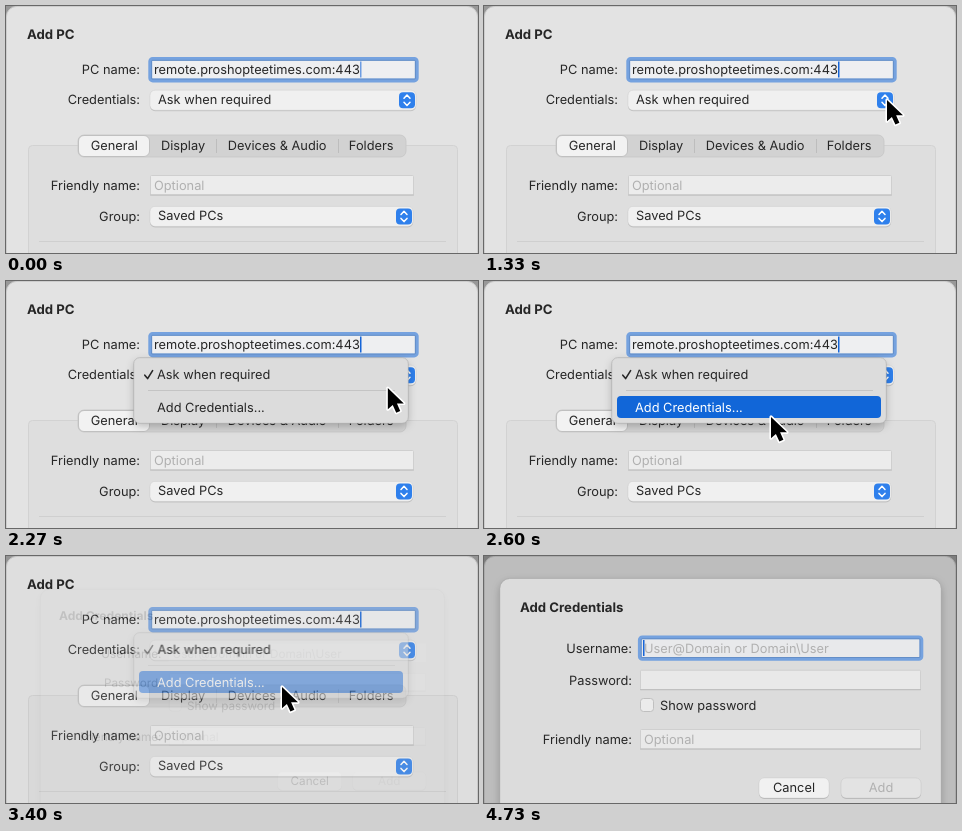
An HTML page for the animation above (5.14 s loop, 472 by 247 pixels).

```html
<!DOCTYPE html>
<html lang="en">
<head>
<meta charset="utf-8">
<title>Add PC</title>
<style>
html, body { margin: 0; width: 100%; height: 100%; overflow: hidden; background: #989898; }
svg { display: block; width: 472px; height: 247px; }
text { font: 12.8px Inter, "Liberation Sans", sans-serif; fill: #262626; white-space: pre; text-rendering: geometricPrecision; }
.bold { font-size: 13.2px; font-weight: 700; }
.end { text-anchor: end; }
.mid { text-anchor: middle; }
.hint { fill: #b0b0b0; }
.lit { fill: #fff; }
.caret { fill: #1565d8; }
.ring { fill: none; stroke: #75a2df; stroke-width: 3.8; }
.rim { fill: none; stroke: #6089c2; stroke-width: .8; }
</style>
</head>
<body>
<svg id="stage" viewBox="0 0 472 247" xmlns="http://www.w3.org/2000/svg"></svg>
<script>
const LOOP = 5140;
const stage = document.getElementById('stage');

const rect = (x, y, w, h, r, fill, more = '') =>
  `<rect x="${x}" y="${y}" width="${w}" height="${h}" rx="${r}" fill="${fill}" ${more}/>`;
const text = (x, y, s, cls = '') => `<text x="${x}" y="${y}" class="${cls}">${s}</text>`;
const line = (x1, x2, y, color) =>
  `<path d="M${x1} ${y}H${x2}" stroke="${color}" fill="none"/>`;

const field = (x, y, w, fill) =>
  rect(x + .5, y + .5, w - 1, 19.5, 1, fill, 'stroke="#cfcfcf"') +
  line(x, x + w, y + 20, '#bcbcbc');

// Focus ring around a field whose inner edge is given
const ring = (id, x, y, w, h) =>
  `<g id="${id}"><rect class="ring" x="${x - 1.4}" y="${y - 1.4}" width="${w + 2.8}" height="${h + 2.8}" rx="2.5"/>` +
  `<rect class="rim" x="${x}" y="${y}" width="${w}" height="${h}" rx="1"/></g>`;

const button = (x, y, w, fill) =>
  rect(x, y + 1, w, 20, 5, '#000', 'opacity=".13"') +
  rect(x, y, w, 20, 5, fill, 'stroke="#000" stroke-opacity=".07" stroke-width=".8"');

function popup(x, y, w, label) {
  const bx = x + w - 17, cx = bx + 8, cy = y + 10;
  return button(x, y, w, '#f0f0f0') + text(152, y + 14, label) +
    rect(bx, y + 2, 16, 16, 4, '#2f80ec') +
    `<path d="M${cx - 3} ${cy - 2}l3-3.2 3 3.2M${cx - 3} ${cy + 2}l3 3.2 3-3.2"
      fill="none" stroke="#fff" stroke-width="1.5" stroke-linecap="round" stroke-linejoin="round"/>`;
}

const tabs =
  rect(72, 129, 328, 22, 6, '#d2d2d2', 'stroke="#c6c6c6" stroke-width=".8"') +
  rect(72.5, 129.5, 71, 21, 5.5, '#f2f2f2', 'stroke="#b9b9b9" stroke-width=".8"') +
  '<path d="M210.5 133v14M332.5 133v14" stroke="#bdbdbd"/>' +
  text(108.3, 144, 'General', 'mid') + text(177, 144, 'Display', 'mid') +
  text(271.2, 144, 'Devices &amp; Audio', 'mid') + text(365.2, 144, 'Folders', 'mid');

const pcWindow =
  rect(.5, .5, 471, 270, 10, '#e3e3e3', 'stroke="#cdcdcd"') +
  text(21, 33, 'Add PC', 'bold') +
  text(134, 68, 'PC name:', 'end') +
  rect(145, 54, 265, 20, 1, '#eeeff1') + ring('pcRing', 145.6, 54.3, 263.8, 18.8) +
  text(148, 68, 'remote.proshopteetimes.com:443') +
  '<rect id="pcCaret" class="caret" x="354" y="55.5" width="1.5" height="16"/>' +
  text(134, 98.3, 'Credentials:', 'end') + popup(144, 84.2, 266, 'Ask when required') +
  rect(22.5, 139.5, 429, 130, 4, '#dedede', 'stroke="#d2d2d2"') + tabs +
  text(134, 184.2, 'Friendly name:', 'end') + field(144, 169, 264, '#ececec') +
  text(148, 184.2, 'Optional', 'hint') +
  text(134, 214.5, 'Group:', 'end') + popup(144, 200.4, 263, 'Saved PCs') +
  line(33, 440, 235.5, '#cfcfcf');

const menu =
  `<g id="menu"><g filter="url(#shade)">${rect(128, 77, 274, 65, 6, '#dcdcdc')}</g>` +
  rect(127.7, 76.7, 274.6, 65.6, 6, 'none', 'stroke="#b2b2b2" stroke-width=".7"') +
  rect(133, 82, 264, 22, 4, '#1166d8', 'id="row0"') +
  rect(133, 115, 264, 22, 4, '#1166d8', 'id="row1"') +
  '<path id="check" d="M138.8 94.2l2.8 3.4 5-8" fill="none" stroke-width="1.6" stroke-linecap="round" stroke-linejoin="round"/>' +
  '<text id="item0" x="151" y="98">Ask when required</text>' +
  line(142, 389, 109.5, '#c4c4c4') +
  '<text id="item1" x="151" y="131">Add Credentials...</text></g>';

const sheet =
  '<rect id="dim" width="472" height="247" fill="#000"/><g id="sheet">' +
  `<g filter="url(#shade)">${rect(16, 22.7, 441, 270, 10, '#dcdcdc')}</g>` +
  rect(15.7, 22.4, 441.6, 271, 10, 'none', 'stroke="#acacac" stroke-width=".7"') +
  text(36, 56, 'Add Credentials', 'bold') +
  text(148, 97, 'Username:', 'end') + rect(156, 82, 281, 20, 1, '#e8e9eb') +
  ring('userRing', 157.2, 82.7, 278.8, 18.8) +
  text(160, 97, 'User@Domain or Domain\\User', 'hint') +
  '<rect id="userCaret" class="caret" x="159" y="84" width="1.5" height="16"/>' +
  text(148, 129, 'Password:', 'end') + field(156, 113.7, 281, '#e9e9e9') +
  rect(156.5, 142.5, 13, 13, 3, '#ebebeb', 'stroke="#bcbcbc" stroke-width=".9"') +
  text(176, 154, 'Show password') +
  text(148, 188, 'Friendly name:', 'end') + field(156, 173, 281, '#e9e9e9') +
  text(160, 188, 'Optional', 'hint') +
  button(275, 222, 70, '#f1f1f1') +
  text(310, 236, 'Cancel', 'mid') +
  button(357, 222, 80, '#e3e3e3') + text(397, 236, 'Add', 'mid hint') + '</g>';

const arrow =
  '<path id="arrow" d="M0 0V21.2L4.9 16.9 8.4 24.6 12.4 22.8 9.1 15.3H16Z" fill="#000" stroke="#fff" stroke-width="3.2" paint-order="stroke" stroke-linejoin="round"/>';

stage.innerHTML =
  `<defs><filter id="shade" x="-10%" y="-30%" width="120%" height="170%">
    <feDropShadow dx="0" dy="3" stdDeviation="4.5" flood-color="#000" flood-opacity=".24"/>
  </filter></defs>` + pcWindow + menu + sheet + arrow;

const $ = id => document.getElementById(id);
const set = (id, name, value) => $(id).setAttribute(name, value);
const show = (id, a) => set(id, 'opacity', a);
const ramp = (t, a, b) => Math.min(1, Math.max(0, (t - a) / (b - a)));
const easeOut = k => 1 - (1 - k) ** 3;

// Pointer stops: time, x, y
const stops = [
  [0, 478, 258], [200, 475, 250], [530, 456, 198], [730, 432, 137], [1070, 412, 104],
  [1330, 403, 94], [2080, 403, 94], [2270, 382, 107], [2600, 287, 136], [2700, 287, 136],
  [2930, 276, 131], [4200, 276, 131], [4470, 271, 172], [4720, 262, 262], [LOOP, 262, 262]
];

const slope = (i, c) =>
  (stops[i + 1][c] - stops[i][c]) / (stops[i + 1][0] - stops[i][0]);

// Harmonic mean keeps the curve free of overshoot
function tangent(i, c) {
  if (i === 0 || i === stops.length - 1) return 0;
  const a = slope(i - 1, c), b = slope(i, c);
  return a * b <= 0 ? 0 : 2 * a * b / (a + b);
}

function pointer(t) {
  let i = 0;
  while (i < stops.length - 2 && t >= stops[i + 1][0]) i++;
  const p = stops[i], q = stops[i + 1], d = q[0] - p[0], k = (t - p[0]) / d;
  return [1, 2].map(c =>
    p[c] + (q[c] - p[c]) * k * k * (3 - 2 * k) +
    d * k * (1 - k) * ((1 - k) * tangent(i, c) - k * tangent(i + 1, c)));
}

function draw(t) {
  const [x, y] = pointer(t);
  set('arrow', 'transform', `translate(${x} ${y})`);

  show('pcCaret', t < 1000 ? .6 * (1 - ramp(t, 0, 200)) : ramp(t, 1000, 1200));
  show('userCaret', ramp(t, 3700, 3870) - ramp(t, 4250, 4400) + ramp(t, 4580, 4720));

  show('menu', ramp(t, 1440, 1540) * (1 - ramp(t, 3340, 3470)));
  const flash = t >= 3270 && t < 3330;
  const inside = x > 133 && x < 397 && !flash;
  const on = [inside && y > 82 && y < 104, inside && y > 115 && y < 137];
  on.forEach((lit, i) => {
    show('row' + i, +lit);
    set('item' + i, 'class', lit ? 'lit' : '');
  });
  set('check', 'stroke', on[0] ? '#fff' : '#262626');

  const k = easeOut(ramp(t, 3390, 3600)), s = .9 + .1 * k;
  show('dim', .17 * k);
  show('sheet', k);
  set('sheet', 'transform', `translate(236 150) scale(${s}) translate(-236 -150)`);
  show('userRing', ramp(t, 3440, 3560));
}

const start = performance.now();
function tick() {
  draw((performance.now() - start) % LOOP);
  requestAnimationFrame(tick);
}
tick();
</script>
</body>
</html>
```
